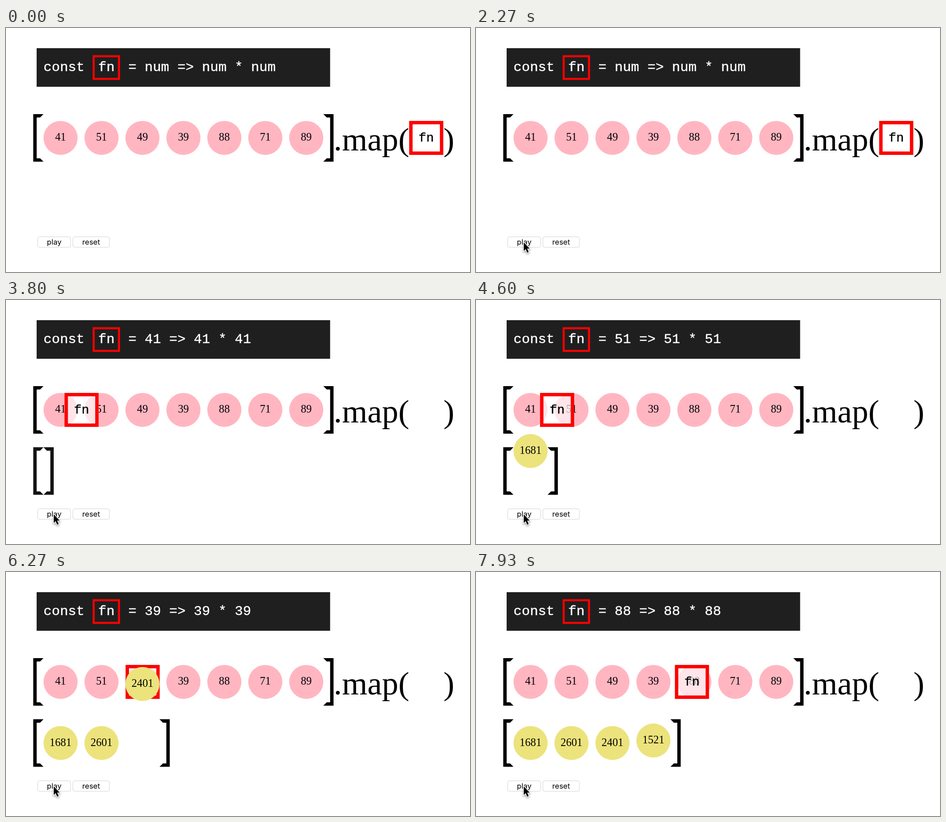
Recreate the animation shown at these times as an HTML page with a canvas. Size 1030 by 544 pixels, loop 8 s.

```html
<!DOCTYPE html>
<html lang="en">
<head>
<meta charset="utf-8">
<title>Array map</title>
<style>
  html, body { margin: 0; width: 100%; height: 100%; overflow: hidden; background: #fff; }
  canvas { display: block; }
</style>
</head>
<body>
<canvas id="stage" width="1030" height="544"></canvas>
<script>
const ctx = document.getElementById('stage').getContext('2d');
const LOOP = 8000;
const UNIT = 1.515;               // one layout unit in pixels
const PITCH = 60 * UNIT;
const LEFT = 60.5, ROW_X = LEFT + 15 * UNIT;
const ROW1 = 192, ROW2 = 328.3;   // tops of the two arrays
const FN_HOME = 895;
const SERIF = '"Liberation Serif", serif';
const MONO = '"Liberation Mono", monospace';
const SANS = 'Inter, sans-serif';

const numbers = [41, 51, 49, 39, 88, 71, 89];
const fnStarts = [3097, 4224, 5218, 6261, 7229];
const dropStarts = [4208, 5198, 6220, 7186];
const FADE_START = 3143;
const cursorPath = [[1200, 51, 408], [1300, 51, 408], [1730, 97, 455], [1930, 106, 478]];
const arrow = [[0, 0], [0, 19], [4.3, 15.1], [7.6, 23], [10.9, 21.6], [7.6, 13.8], [13.2, 13.8]];

const clamp = v => Math.min(1, Math.max(0, v));
const mix = (a, b, p) => a + (b - a) * p;

// cubic-bezier(.25, .1, .25, 1), solved by bisection
function ease(x) {
  x = clamp(x);
  if (x === 0 || x === 1) return x;
  const curve = (s, a, b) => 3 * (1 - s) ** 2 * s * a + 3 * (1 - s) * s * s * b + s ** 3;
  let lo = 0, hi = 1;
  for (let i = 0; i < 20; i++) {
    const mid = (lo + hi) / 2;
    if (curve(mid, .25, .25) < x) lo = mid; else hi = mid;
  }
  return curve(lo, .1, 1);
}
const progress = (t, start) => ease((t - start) / 1000);

function text(str, x, y, size, family, color = '#000', align = 'left') {
  ctx.font = `${size}px ${family}`;
  ctx.fillStyle = color;
  ctx.textAlign = align;
  ctx.fillText(str, x, y);
}

function code(str, x, y, size, color) {
  text(str, x, y, size, MONO, color);
  ctx.strokeStyle = color;
  ctx.lineWidth = .4;
  ctx.strokeText(str, x, y);
}

function polygon(points) {
  ctx.beginPath();
  points.forEach(([x, y]) => ctx.lineTo(x, y));
  ctx.closePath();
}

function frame(x, y, w, h, line) {
  ctx.strokeStyle = '#f00';
  ctx.lineWidth = line;
  ctx.strokeRect(x + line / 2, y + line / 2, w - line, h - line);
}

// Square bracket with slanted arm ends; dir is 1 for "[" and -1 for "]"
function bracket(x, y, dir) {
  const b = 5 * UNIT, h = 70 * UNIT;
  ctx.fillStyle = '#000';
  polygon([[0, 0], [3 * b, 0], [2 * b, b], [b, b], [b, h - b], [2 * b, h - b], [3 * b, h], [0, h]]
    .map(([px, py]) => [x + dir * px, y + py]));
  ctx.fill();
}

function brackets(y, count) {
  const inner = count ? count * PITCH - 10 * UNIT : 0;
  bracket(LEFT, y, 1);
  bracket(ROW_X + inner + 15 * UNIT, y, -1);
}

function ball(value, index, top, color) {
  const r = 25 * UNIT, x = ROW_X + index * PITCH + r;
  ctx.fillStyle = color;
  ctx.beginPath();
  ctx.arc(x, top + r, r, 0, 2 * Math.PI);
  ctx.fill();
  text(value, x, top + r + 6.3, 16 * UNIT, SERIF, '#000', 'center');
}

function button(label, x, w) {
  ctx.beginPath();
  ctx.roundRect(x + .5, 465.5, w - 1, 23.5, 4);
  ctx.fillStyle = '#fff';
  ctx.fill();
  ctx.strokeStyle = '#d2d2d2';
  ctx.lineWidth = 1;
  ctx.stroke();
  text(label, x + w / 2, 482.8, 16.5, SANS, '#000', 'center');
}

function codePanel(step) {
  const arg = step < 0 ? 'num' : numbers[step];
  ctx.fillStyle = '#1f1f1f';
  ctx.fillRect(68, 45, 651.5, 86);
  const size = 20 * UNIT, y = 96;
  code('const', 83.3, y, size, '#fff');
  code('fn', 204.7, y, size, '#fff');
  code(`= ${arg} => ${arg} * ${arg}`, 271.4, y, size, '#fff');
  frame(192.3, 60.7, 60.8, 55, 3 * UNIT);
}

function fnBox(t, step) {
  const slot = i => i < 0 ? FN_HOME : ROW_X + i * PITCH;
  const x = step < 0 ? FN_HOME : mix(slot(step - 1), slot(step), progress(t, fnStarts[step]));
  const y = ROW1 + 10 * UNIT, size = 50 * UNIT;
  ctx.fillStyle = 'rgba(255,255,255,.65)';
  ctx.fillRect(x, y, size, size);
  frame(x, y, size, size, 5 * UNIT);
  code('fn', x + size / 2 - 16.8, 252.7, 28, '#000');
}

function cursor(t) {
  if (t < cursorPath[0][0]) return;
  let [, x, y] = cursorPath[cursorPath.length - 1];
  const next = cursorPath.findIndex(p => p[0] > t);
  if (next > 0) {
    const [t0, x0, y0] = cursorPath[next - 1], [t1, x1, y1] = cursorPath[next];
    const p = (t - t0) / (t1 - t0);
    x = mix(x0, x1, p);
    y = mix(y0, y1, p);
  }
  ctx.save();
  ctx.translate(x, y);
  polygon(arrow);
  ctx.shadowColor = 'rgba(0,0,0,.45)';
  ctx.shadowBlur = 4;
  ctx.shadowOffsetY = 2;
  ctx.strokeStyle = '#fff';
  ctx.lineWidth = 2.6;
  ctx.stroke();
  ctx.shadowColor = 'transparent';
  ctx.fillStyle = '#000';
  ctx.fill();
  ctx.restore();
}

function draw(now) {
  const t = now % LOOP;
  const step = fnStarts.filter(s => t >= s).length - 1;
  const drops = dropStarts.filter(s => t >= s);
  const top1 = ROW1 + 10 * UNIT, top2 = ROW2 + 10 * UNIT;

  ctx.fillStyle = '#fff';
  ctx.fillRect(0, 0, 1030, 544);
  codePanel(step);

  brackets(ROW1, numbers.length);
  numbers.forEach((n, i) => ball(n, i, top1, '#ffb6c1'));
  text('.map(', 727.5, 272.5, 48 * UNIT, SERIF);
  text(')', 971, 272.5, 48 * UNIT, SERIF);
  fnBox(t, step);

  ctx.globalAlpha = progress(t, FADE_START);
  brackets(ROW2, drops.length);
  ctx.globalAlpha = 1;
  drops.forEach((start, i) =>
    ball(numbers[i] ** 2, i, mix(top1, top2, progress(t, start)), '#ece37c'));

  button('play', 70, 74);
  button('reset', 148, 82);
  cursor(t);
}

const begin = performance.now();
function tick() {
  draw(performance.now() - begin);
  requestAnimationFrame(tick);
}
tick();
</script>
</body>
</html>
```
